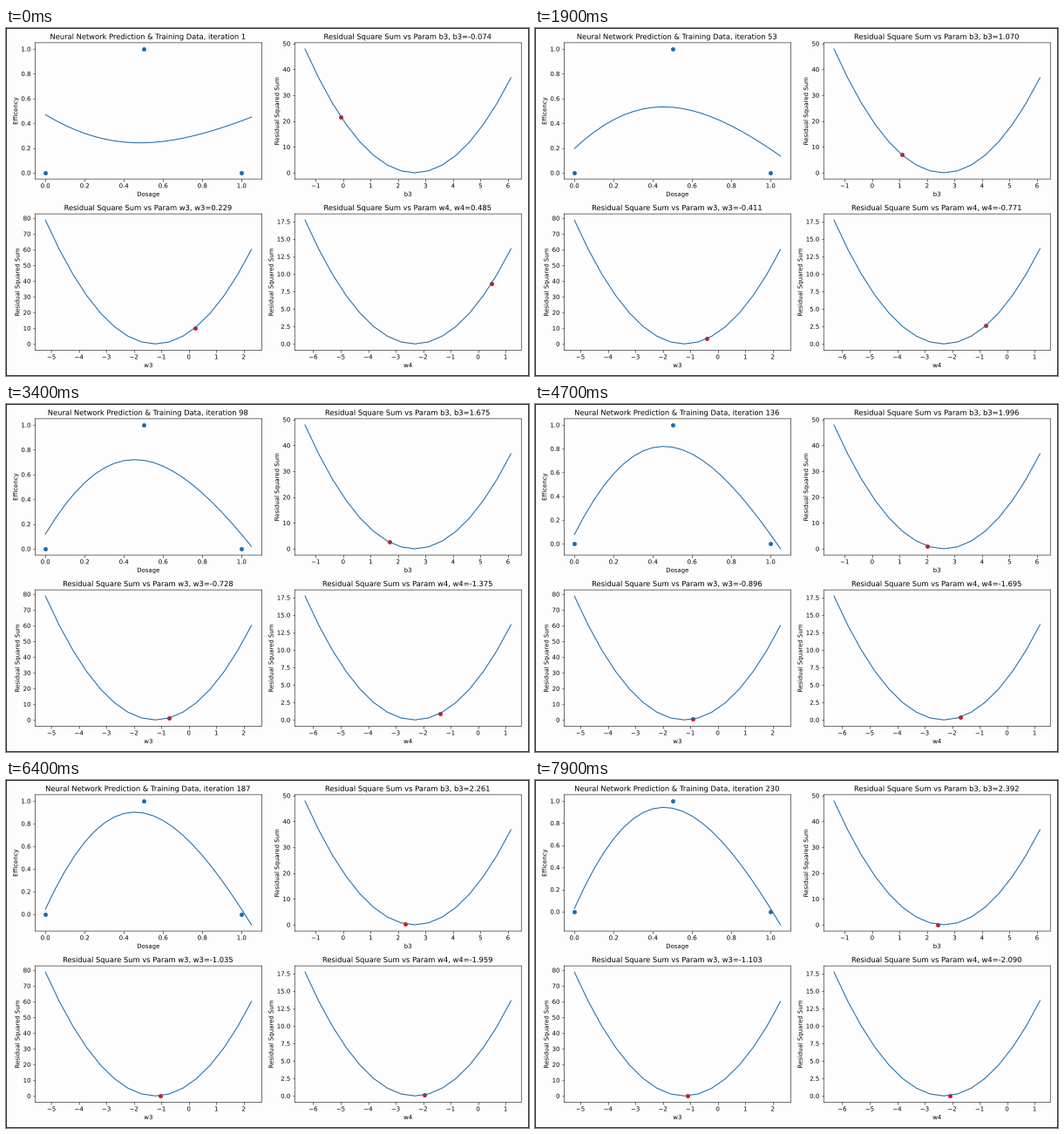
A matplotlib script for the animation above (8 s loop, 600 by 399 pixels).

```python
import numpy as np
import matplotlib.pyplot as plt
from matplotlib import patheffects
from matplotlib.animation import FuncAnimation

W, H, DPI = 600, 399, 50
FRAMES, INTERVAL = 80, 100
BLUE, RED, PAPER = "#1b6cab", "#e0101c", "#fdfdfd"
RATE = 0.1  # learning rate

plt.rcParams.update({
    "font.family": "DejaVu Sans",
    "text.hinting": "none",
    "path.snap": False,
    # Text as outlines, so that glyphs keep fractional positions
    "path.effects": [patheffects.Normal()],
    "axes.facecolor": PAPER,
})


def softplus(x):
    return np.log1p(np.exp(x))


def features(x):
    """Columns multiplied by w3, w4 and b3."""
    x = np.asarray(x, float)
    return np.stack([softplus(3.34 * x - 1.43),
                     softplus(-3.53 * x + 0.57),
                     np.ones_like(x)], axis=1)


dose = np.array([0, 0.5, 1])
effect = np.array([0, 1, 0])
A = features(dose)
best = np.linalg.solve(A, effect)
curvature = (A ** 2).sum(axis=0)


def loss(k, value):
    """Squared error when only parameter k is off its best value."""
    return curvature[k] * (value - best[k]) ** 2


# Gradient descent on w3, w4, b3; path[i] belongs to iteration i + 1
path = [np.array([0.2289, 0.4848, -0.0738])]
for _ in range(240):
    p = path[-1]
    path.append(p + 2 * RATE * A.T @ (effect - A @ p))


def iteration(frame):
    knots = [0, 12, 27, 34, 47, 64, 79]
    counts = [1, 33, 76, 98, 136, 187, 230]
    return int(round(np.interp(frame, knots, counts)))


# The outer half of the 2 px edge is cut off, leaving a 1 px border
fig = plt.figure(figsize=(W / DPI, H / DPI), dpi=DPI, facecolor=PAPER,
                 edgecolor="#303030", linewidth=2 * 72 / DPI)

LEFT, RIGHT = 33.4, 331.2
TOP_ROW, LOW_ROW = 173.1, 369.3


def panel(left, bottom, xlabel, ylabel):
    """Axes placed by left and bottom edge in pixels from the top left."""
    ax = fig.add_axes([left / W, 1 - bottom / H, 260 / W, 156.2 / H])
    ax.set_xlabel(xlabel)
    ax.set_ylabel(ylabel)
    return ax


# Prediction panel
fit_ax = panel(LEFT, TOP_ROW, "Dosage", "Efficency")
xs = np.arange(22) * 0.05
basis = features(xs)
fit_ax.scatter(dose, effect, color=BLUE)
fit_line, = fit_ax.plot(xs, basis @ path[0], color=BLUE)
fit_ax.set_xlim(-0.0525, 1.1025)

# Loss panels: name, index, centre of the curve, position
panels = []
for name, k, centre, left, bottom in [("b3", 2, 2.61, RIGHT, TOP_ROW),
                                      ("w3", 0, -1.22, LEFT, LOW_ROW),
                                      ("w4", 1, -2.30, RIGHT, LOW_ROW)]:
    ax = panel(left, bottom, name, "Residual Squared Sum")
    grid = centre - 4 + 0.5 * np.arange(16)
    curve = loss(k, grid)
    ax.plot(grid, curve, color=BLUE)
    dot = ax.scatter([grid[0]], [curve[0]], color=RED)
    ax.set_xlim(grid[0] - 0.375, grid[-1] + 0.375)
    pad = 0.05 * np.ptp(curve)
    ax.set_ylim(curve.min() - pad, curve.max() + pad)
    panels.append((name, k, ax, dot))


def update(frame):
    n = iteration(frame)
    params = path[n - 1]

    ys = basis @ params
    fit_line.set_ydata(ys)
    low, high = min(0, ys.min()), max(1, ys.max())
    pad = 0.05 * (high - low)
    fit_ax.set_ylim(low - pad, high + pad)
    fit_ax.set_title(
        f"Neural Network Prediction & Training Data, iteration {n}")

    for name, k, ax, dot in panels:
        value = params[k]
        dot.set_offsets([[value, loss(k, value)]])
        ax.set_title(
            f"Residual Square Sum vs Param {name}, {name}={value:.3f}")
    return []


anim = FuncAnimation(fig, update, frames=FRAMES, init_func=lambda: update(0),
                     interval=INTERVAL, repeat=True, repeat_delay=0,
                     blit=False)
plt.show()
```
